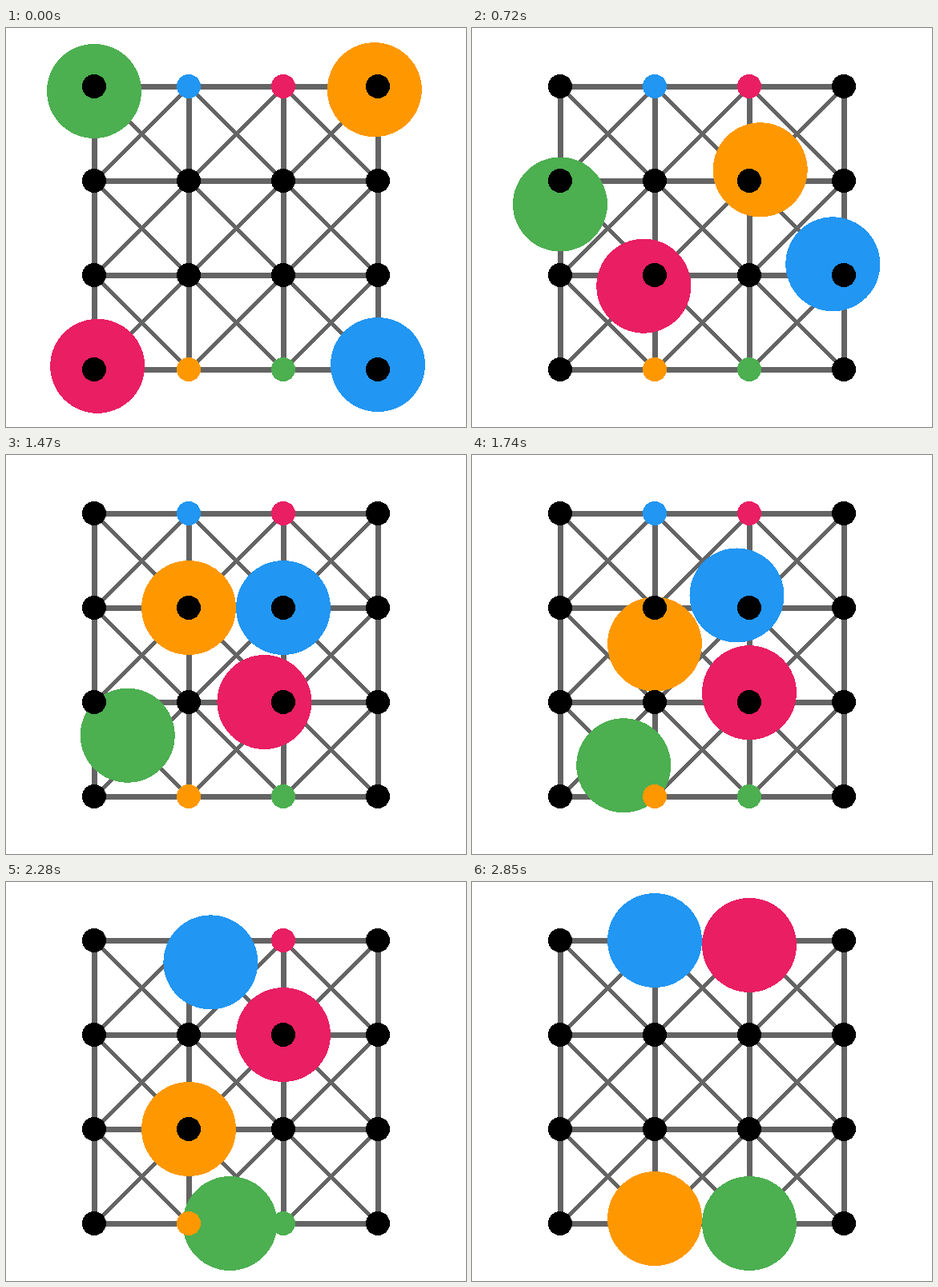
Write an HTML page that moves like this. It is 574x499 px and loops after 2880 ms.

```html
<!DOCTYPE html>
<html lang="en">
<head>
<meta charset="utf-8">
<title>Discs on a grid</title>
<style>
html, body { margin: 0; width: 100%; height: 100%; overflow: hidden; background: #fff; }
svg { display: block; shape-rendering: crispEdges; }
</style>
</head>
<body>
<svg id="stage" width="574" height="499" viewBox="0 0 574 499"></svg>
<script>
const GREEN = '#4caf50', ORANGE = '#ff9800', BLUE = '#2196f3', PINK = '#e91e63';
const CELL = 118, STEP = 30, STEPS = 96, STEPS_PER_CELL = 20;
const stage = document.getElementById('stage');
const px = col => 110 + CELL * col;
const py = row => 73 + CELL * row;

function add(tag, attrs) {
  const el = document.createElementNS('http://www.w3.org/2000/svg', tag);
  for (const name in attrs) el.setAttribute(name, attrs[name]);
  stage.append(el);
  return el;
}

function line(x1, y1, x2, y2, width) {
  add('path', {
    d: `M${px(x1) + .5} ${py(y1) + .5}L${px(x2) + .5} ${py(y2) + .5}`,
    stroke: '#646464', 'stroke-width': width
  });
}

const circle = (x, y, r, fill) => add('circle', { cx: px(x), cy: py(y), r, fill });

for (let i = 0; i < 4; i++) {
  line(0, i, 3, i, 7);
  line(i, 0, i, 3, 7);
}
for (let x = 0; x < 3; x++) {
  for (let y = 0; y < 3; y++) {
    line(x, y, x + 1, y + 1, 5);
    line(x + 1, y, x, y + 1, 5);
  }
}

// Start cell, then legs: [departure step, column, row]. All legs share one speed.
const discs = [
  { fill: GREEN, start: [0, 0], legs: [[0, 0, 2], [40, 1, 3], [68.28, 2, 3]] },
  { fill: ORANGE, start: [3, 0], legs: [[0, 2, 1], [28.28, 1, 1], [51.28, 1, 2], [77, 1, 3]] },
  { fill: PINK, start: [0, 3], legs: [[0, 1, 2], [34, 2, 2], [57, 2, 0]] },
  { fill: BLUE, start: [3, 3], legs: [[0, 3, 2], [21.72, 2, 1], [55.28, 1, 0]] }
];
for (const disc of discs) disc.el = circle(...disc.start, 59, disc.fill);

const dotColors = { '1,0': BLUE, '2,0': PINK, '1,3': ORANGE, '2,3': GREEN };
for (let x = 0; x < 4; x++) {
  for (let y = 0; y < 4; y++) circle(x, y, 15, dotColors[[x, y]] || '#000');
}

function position({ start, legs }, step) {
  let [x, y] = start;
  for (const [from, toX, toY] of legs) {
    if (step <= from) break;
    const dx = toX - x, dy = toY - y;
    const part = Math.min(1, (step - from) / (STEPS_PER_CELL * Math.hypot(dx, dy)));
    x += dx * part;
    y += dy * part;
  }
  return [x, y];
}

function draw(now) {
  const step = Math.floor(now / STEP) % STEPS + 1;
  for (const disc of discs) {
    const [x, y] = position(disc, step);
    disc.el.setAttribute('cx', px(x));
    disc.el.setAttribute('cy', py(y));
  }
}

const begin = performance.now();
function tick() {
  draw(performance.now() - begin);
  requestAnimationFrame(tick);
}
tick();
</script>
</body>
</html>
```
